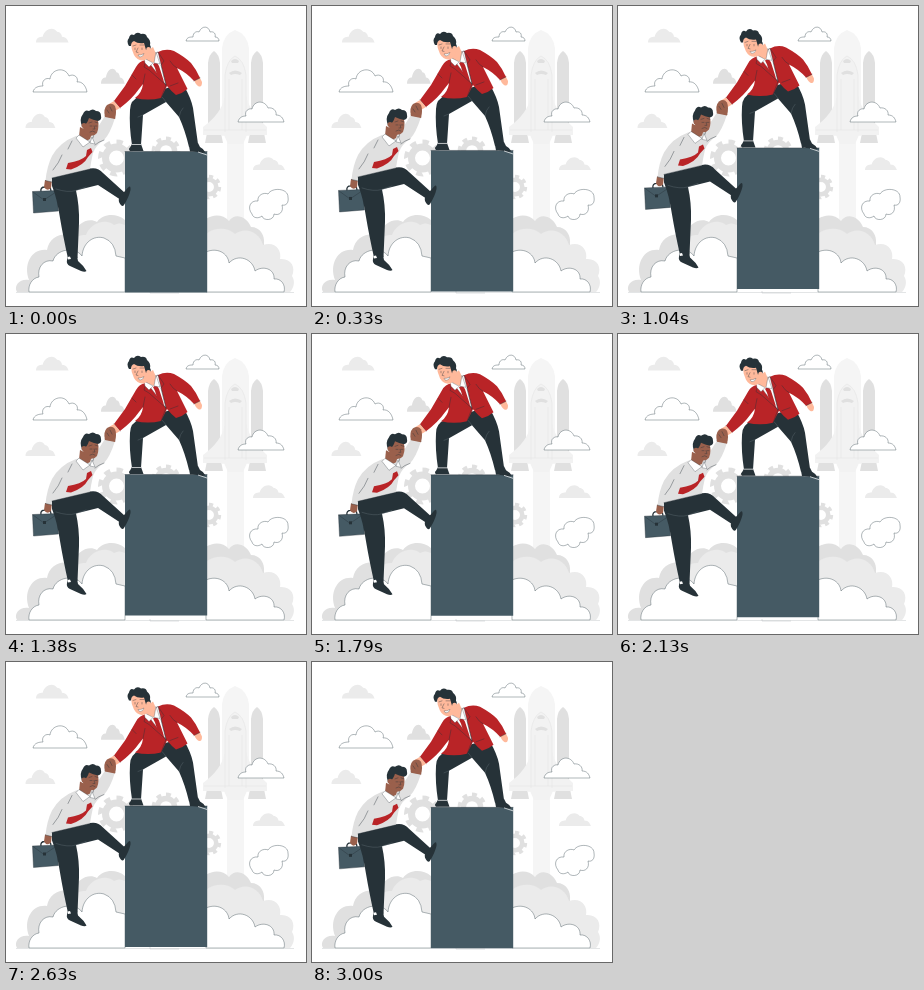
Animation of 300x300 px, one loop 3.04 s. Source, as an HTML page:

```html
<!DOCTYPE html>
<html lang="en">
<head>
<meta charset="utf-8">
<title>Helping hand</title>
<style>
  html, body { margin: 0; width: 100%; height: 100%; overflow: hidden; background: #fff; }
  svg { display: block; width: 100vw; height: 100vh; }
  .pale { fill: #f5f5f5; }
  .soft { fill: #ebebeb; }
  .grey { fill: #e0e0e0; }
  .line { fill: #fff; stroke: #37474f; stroke-width: .4; stroke-linejoin: round; }
  .gear { fill: none; stroke: #e0e0e0; }
  .dark { fill: #263238; }
  .red { fill: #b92427; }
  .shirt { fill: #e0e0e0; }
  .pink { fill: #ffb99b; }
  .brown { fill: #9a604c; }
  .fold { fill: none; stroke: #263238; stroke-width: .4; stroke-linecap: round; }
  .light { stroke: #78868c; stroke-width: .3; }
  .white { fill: #fff; stroke: #263238; stroke-width: .3; }
</style>
</head>
<body>
<svg viewBox="0 0 300 300">
  <defs>
    <path id="puff" d="M0 15C0 10 4 9 7 9C9 1 18-2 22 4C25 4 27 7 27 9C32 9 33 13 34 15Z"/>
    <g id="cog" class="gear">
      <circle r="11" stroke-width="7"/>
      <circle r="16" stroke-width="5" pathLength="16" stroke-dasharray="1"/>
    </g>
  </defs>

  <!-- sky -->
  <use class="soft" href="#puff" transform="translate(30 22) scale(.96)"/>
  <use class="soft" href="#puff" transform="translate(19.500 107) scale(.88 1)"/>
  <use class="grey" href="#puff" transform="translate(95 62) scale(.7 1.050)"/>
  <use class="soft" href="#puff" transform="translate(247 150.500) scale(.94 .9)"/>

  <!-- shuttle and trail -->
  <path class="pale" d="M221 134H238V250H221Z"/>
  <path class="grey" d="M202 128V57Q203 48 208 45Q213 48 214 57V128ZM245 128V57Q246 48 251 45Q256 48 257 57V128Z"/>
  <path class="grey" d="M201 127H215L217 137H199ZM244 127H258L260 137H242Z"/>
  <path class="pale" d="M216 130V42Q218 28 229 24Q241 28 243 42V130Z"/>
  <path fill="#f2f2f2" d="M219 126V69Q221 54 229 50Q238 54 240 69V90Q244 107 261 121V129H241L237 138H222L218 129H197V121Q215 108 219 91Z"/>
  <path class="grey" d="M225 55Q229 51 233 55L232 57H226ZM223 67Q229 62 236 67L234 69Q229 67 225 69Z"/>
  <path fill="none" stroke="#e4e4e4" stroke-width=".6" d="M219 126V69Q221 54 229 50Q238 54 240 69V126M223 73V124M236 73V124M198 124H260"/>

  <g class="line">
    <path d="M27 86C28 81 33 80 37 80C35 75 40 71 44 73C45 63 59 60 63 70C68 67 73 72 71 76C76 75 80 80 81 86Z"/>
    <path d="M180 35C181 31 184 31 187 31C187 26 191 25 193 26C196 19 203 20 204 26C208 25 210 28 209 31C212 31 213 33 213 35Z"/>
    <path d="M232 116C233 111 237 110 240 110C238 105 243 102 246 103C248 94 259 94 262 102C267 101 271 105 270 109C275 109 277 112 278 116Z"/>
    <path d="M246 208C241 202 244 194 252 195C251 189 258 186 262 188C266 181 282 182 282 191C283 197 280 200 276 199C278 206 273 210 268 208C268 215 257 215 256 210C252 213 247 212 246 208Z"/>
  </g>

  <!-- smoke -->
  <path class="grey" d="M11 286C7 279 15 272 23 274C17 258 26 242 41 244C43 231 55 226 67 229C70 218 82 211 91 216C97 207 111 207 119 214V286Z"/>
  <path class="soft" d="M64 286V250C60 238 70 228 80 229C84 217 100 212 108 219Q113 216 119 219V286Z"/>
  <path class="grey" d="M200 213C207 208 217 208 223 215C228 207 240 209 245 221C254 221 259 229 258 238V286H200Z"/>
  <path class="soft" d="M200 228C208 221 222 221 229 228C239 220 254 226 257 239C269 235 276 244 274 253C285 252 290 261 286 270C290 276 287 283 284 286H200Z"/>
  <path class="line" d="M23 286C22 279 26 272 33 271C31 261 38 253 47 255C50 243 69 240 76 250C77 236 88 229 98 232Q109 236 110 250L119 252V286Z"/>
  <path class="line" d="M200 246C211 241 222 247 223 257C232 247 247 253 249 265C257 259 269 263 268 273C275 272 280 279 278 286H200Z"/>
  <path fill="none" stroke="#b8bec1" stroke-width=".4" d="M10 286.500H288"/>
  <path fill="none" stroke="#b8bec1" stroke-width=".5" d="M144 285V287H173"/>

  <use href="#cog" transform="translate(110.500 152)"/>
  <use href="#cog" transform="translate(160 145) scale(.78)"/>
  <use href="#cog" transform="translate(203 181) scale(.66)"/>

  <g id="lift">
    <path fill="#455a64" d="M119 145.500H201.200V286.500H119Z"/>
    <path class="fold" d="M119 145.500H201"/>

    <!-- climber -->
    <path fill="none" stroke="#263238" stroke-width="1.300" d="M35 186Q34 181 39 181Q45 180 45 185"/>
    <path fill="#455a64" stroke="#263238" stroke-width=".4" d="M26.500 185.500L51 184.500L52.500 205L27.500 207Z"/>
    <path class="fold" d="M27 186L38 194L51.500 185"/>
    <path class="dark" d="M37 192H40V195H37Z"/>
    <path class="brown" d="M39 174H46L45 182Q41 186 38 181Z"/>
    <path class="dark" d="M46 171L84 162.500Q92 161 97 167L119 187L115 194L92 179L70 184.500Q73.500 200 73 217L71.500 252L62 252.500Q57 230 54 212Q51 192 46 180Z"/>
    <path class="fold light" d="M50 183Q62 187 70 184.500L80 181"/>
    <path class="dark" d="M113 196Q112 192 115 189L120 184Q125 177 124.500 184Q123 191 118 199Q116 202 113 196Z"/>
    <path class="dark" d="M62 250H71L72 255Q78 260 80.500 265Q79 266.500 75 265L64 260Q60 258 61 254Z"/>
    <path fill="#fff" d="M61.500 251L64 250.500L65 253L62 253.500Z"/>
    <path class="shirt" d="M70 130L88 127L99 110L109 112Q104 128 98 134Q90 139 87 147Q85 156 84 163L46 172L46 176L39.500 174.500Q41 160 46 150Q54 136 70 130Z"/>
    <path class="fold" d="M47 164Q53 157 56 149M46 172L84 163M88 127Q88 131 86 134M39.500 174.500L46 176M99 110L109 112M66 135L62 143M98 134Q92 136 89 139"/>
    <path class="red" d="M81 144L85 142L86.500 146L82 151Q78 159 65 163.500L60 163L62 157Q75 155 80 150Z"/>
    <path class="brown" d="M74 121L86 127L84 133Q78 137 73 131Z"/>
    <path class="brown" d="M78 112Q84 107 91 112Q94 119 91 127Q87 132 79 128Q75 120 78 112Z"/>
    <path class="dark" d="M76 120Q73 113 77 108Q79 103 83 105Q87 102 90 105Q95 105 95 110Q96 114 92 115Q87 114 83 112Q81 118 79 118L78 121Z"/>
    <circle class="brown" cx="78" cy="119.500" r="2.500"/>
    <path class="fold" d="M83 117L86 116M89 116L92 117M84 120H86M89 120H91M88 120L89 123L87 123M84 126Q87 124 89 126"/>
    <path class="white" d="M73 129L84 136L77 141L70 132ZM86 131L89 138L84 137Z"/>

    <!-- helper -->
    <path class="dark" d="M134 90L168 80H178Q185 92 187 102L192 138L183 141Q179 124 173 111L160 96L137 109Q136 124 135 139L126 139Q123 120 124 104Q124 94 134 90Z"/>
    <path class="fold light" d="M160 96Q158 93 156 91M137 109L132 111M173 111Q174 105 177 102"/>
    <path class="dark" d="M126 138H135L137.500 145H124Q122 143 124 141.500ZM183 140L192 137L194 141Q198 143 199.500 146.500L196 147Q190 145 184 145.500Z"/>
    <path fill="none" stroke="#fff" stroke-width=".7" d="M192 146L201 149M126 138.500H135"/>
    <path class="pink" d="M188 73L193 70L196 76Q196 82 192 80Q189 78 188 73Z"/>
    <path class="red" d="M140 54Q133 55 130 61L119 80L108 95L114 102Q126 93 133 83L137 78Q136 87 129 92Q142 95 155 92L161 80Q166 86 170 89Q177 87 181.500 83L171 62Q181 67 188 75L194 72Q190 63 185 57Q179 51 168 45Q160 42 152 46Z"/>
    <path class="white" d="M141 54L152 46L160 79Z"/>
    <path class="red" d="M147 58L150.500 56L153 60L157.500 74L158 80L153 75L149 62Z"/>
    <path class="fold" d="M140 54L138 61L143 64L160 79L155 92M152 46L158 55L155 59L160 79M137 78L139 68M171 62Q167 60 164 55M108 95L114 102M188 75L194 72M126 69L130 73M164 80L172 77"/>
    <path class="pink" d="M137 48L147 41L151 50L148 57L141 54Z"/>
    <path class="white" d="M138 52L147 57L143 61L139 57ZM150 46L148 57L154 58Z"/>
    <path class="pink" d="M125 37Q131 31 139 33L144 40Q145 51 139 54Q132 56 128 49Q125 43 125 37Z"/>
    <path class="dark" d="M123 40Q120 35 123 32Q124 27 128 29Q131 25 135 28Q140 27 141 31Q145 34 144 39Q146 42 143 44L140 44L138 37Q132 38 128 35Q125 36 125 40Z"/>
    <ellipse class="pink" cx="142.500" cy="44" rx="2.300" ry="3"/>
    <path class="fold" d="M127 40L130 39M134 39L138 39M129 42V43.500M136 42V43.500M132 42L130 46L132 46.500"/>
    <path class="white" d="M132 49Q135 49.500 138 47.500Q137 51 134 51Q133 51 132 49Z"/>

    <!-- clasped hands -->
    <path class="pink" d="M108 95L114 102L109 105L103 98Z"/>
    <path class="brown" d="M99 111Q97 103 101 99Q106 96 109 100Q111 105 109 113Z"/>
    <path class="fold" d="M101 104L103 107M104 101L106 105"/>
  </g>
</svg>
<script>
  const FPS = 24, FRAMES = 73, RISE = 5.5;
  const lift = document.getElementById('lift');

  // Steady rise, then steady fall
  function draw() {
    const phase = Math.floor(performance.now() * FPS / 1000) % FRAMES / FRAMES;
    const y = -RISE * (1 - Math.abs(1 - 2 * phase));
    lift.setAttribute('transform', `translate(0 ${y})`);
    requestAnimationFrame(draw);
  }
  draw();
</script>
</body>
</html>
```
